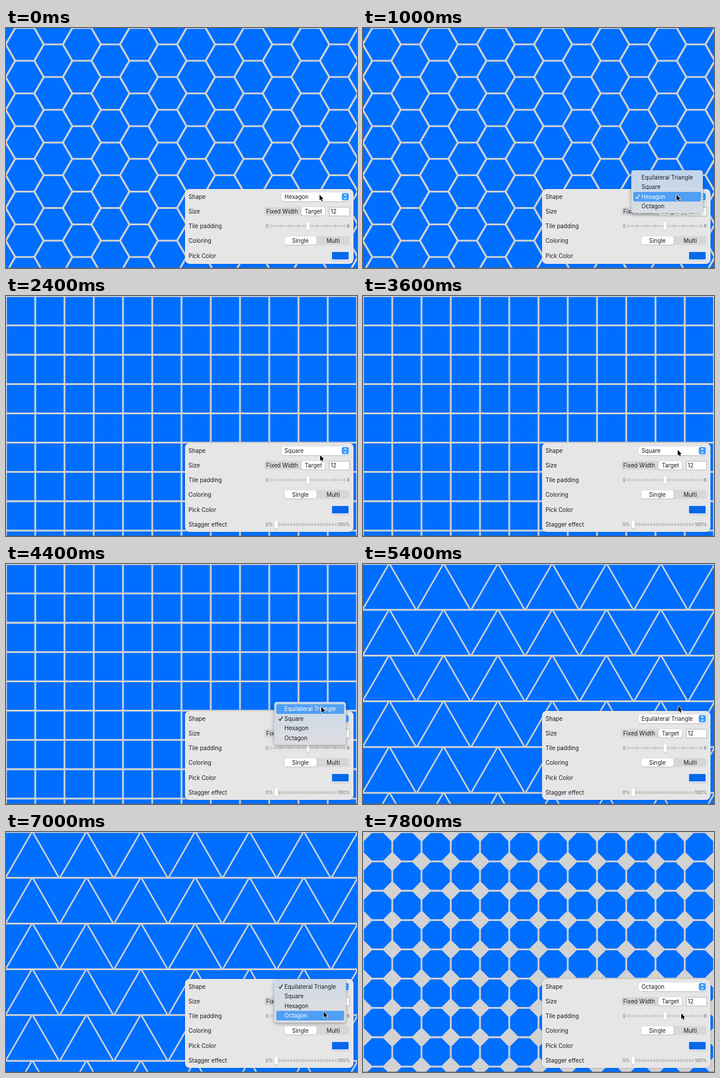
Animation, 600 px wide and 410 px high, one loop 8 s. Source, as an HTML page with a canvas:

```html
<!DOCTYPE html>
<html lang="en">
<head>
<meta charset="utf-8">
<title>Tile shapes</title>
<style>
html, body { margin: 0; width: 100%; height: 100%; overflow: hidden; background: #d2d2d2; }
canvas { display: block; }
</style>
</head>
<body>
<canvas id="stage" width="600" height="410"></canvas>
<script>
const ctx = document.getElementById('stage').getContext('2d');
const W = 600, H = 410, LOOP = 8000, STEP = 200;
const BLUE = '#006fff', GRAY = '#d2d2d2', INK = '#1c1c1e';
const PAD = 3, ROW = 16.5, SIN60 = Math.sqrt(3) / 2;
const FONT = 'Inter, Roboto, sans-serif';
const SHAPES = ['Equilateral Triangle', 'Square', 'Hexagon', 'Octagon'];

// start time, shape index
const scenes = [[0, 2], [2200, 1], [5000, 0], [7400, 3]];
// open time, close time
const menus = [[400, 2200], [4000, 5000], [6200, 7400]];
// time, x, y of the pointer tip
const pointer = [
  [0, 536, 285], [1000, 536, 285], [1800, 537, 272], [2600, 537, 272],
  [3600, 538, 263], [4000, 538, 263], [4400, 539, 244], [5400, 539, 243],
  [6000, 541, 262], [6200, 541, 262], [7000, 543, 307], [7400, 543, 307],
  [7800, 544, 310], [8000, 544, 310]
];

function pointerAt(t) {
  const i = Math.max(1, pointer.findIndex(k => k[0] > t));
  const [a, b] = [pointer[i - 1], pointer[i]];
  const u = (t - a[0]) / (b[0] - a[0]);
  const e = u * u * (3 - 2 * u);
  return [a[1] + (b[1] - a[1]) * e, a[2] + (b[2] - a[2]) * e];
}

function poly(points) {
  points.forEach(([x, y], i) => i ? ctx.lineTo(x, y) : ctx.moveTo(x, y));
  ctx.closePath();
}

function box(x, y, w, h, r, fill, stroke) {
  ctx.beginPath();
  ctx.roundRect(x, y, w, h, r);
  ctx.fillStyle = fill;
  ctx.fill();
  if (stroke) {
    ctx.strokeStyle = stroke;
    ctx.lineWidth = 1;
    ctx.stroke();
  }
}

function raised(x, y, w, h, r, fill = '#fff') {
  ctx.save();
  ctx.shadowColor = 'rgba(0,0,0,.3)';
  ctx.shadowBlur = 1.5;
  ctx.shadowOffsetY = 0.5;
  box(x, y, w, h, r, fill);
  ctx.restore();
}

function text(s, x, mid, { size = 9.75, color = INK, align = 'left' } = {}) {
  ctx.font = `${size}px ${FONT}`;
  ctx.textAlign = align;
  ctx.fillStyle = color;
  ctx.fillText(s, x, mid + size * 0.38);
}

function triangles() {
  const h = 75.2, a = h / SIN60, half = a / 2 + PAD;
  for (let y = PAD / 2; y < H; y += h + PAD) {
    for (let i = -1; i < 14; i++) {
      const x = PAD / 2 + i * half;
      const [base, tip] = i % 2 ? [y, y + h] : [y + h, y];
      poly([[x, base], [x + a, base], [x + a / 2, tip]]);
    }
  }
}

function squares() {
  for (let y = 0.3; y < H; y += 50.05)
    for (let x = 0; x < W; x += 50)
      ctx.rect(x + PAD / 2, y + PAD / 2, 50 - PAD, 50 - PAD);
}

function hexagons() {
  const dy = 55.9, s = (dy - PAD) / SIN60 / 2, dx = 1.5 * s + PAD;
  for (let c = -1; c < 13; c++) {
    for (let r = 0; r < 9; r++) {
      const x = PAD / 2 + s + c * dx, y = (r + (c % 2 ? 0 : 0.5)) * dy;
      poly([0, 1, 2, 3, 4, 5].map(k => [
        x + s * Math.cos(k * Math.PI / 3), y + s * Math.sin(k * Math.PI / 3)
      ]));
    }
  }
}

function octagons() {
  const n = 50 - PAD, c = n / (2 + Math.SQRT2);
  for (let y = 0.3 + PAD / 2; y < H; y += 50.05)
    for (let x = PAD / 2; x < W; x += 50)
      poly([
        [x + c, y], [x + n - c, y], [x + n, y + c], [x + n, y + n - c],
        [x + n - c, y + n], [x + c, y + n], [x, y + n - c], [x, y + c]
      ]);
}

const patterns = [triangles, squares, hexagons, octagons];

function drawTiles(shape) {
  ctx.fillStyle = GRAY;
  ctx.fillRect(0, 0, W, H);
  ctx.beginPath();
  patterns[shape]();
  ctx.fillStyle = BLUE;
  ctx.fill();
  ctx.fillStyle = 'rgba(90,90,90,.5)';
  ctx.fillRect(0, H - 1, W, 1);
}

function segmented(x, mid, w, selX, selW, labels) {
  box(x, mid - 7.5, w, 15, 4, '#d7d7d8');
  raised(selX, mid - 7.2, selW, 14.4, 4);
  for (const [s, cx] of labels) text(s, cx, mid, { align: 'center' });
}

function slider(mid, from, to, ticks, first, last, thumb) {
  box(from, mid - 1.5, to - from, 3, 1.5, '#d0d0d1');
  ctx.fillStyle = '#bcbcbd';
  for (let i = 0; i < ticks; i++)
    ctx.fillRect(first + (last - first) * i / (ticks - 1) - 0.6, mid - 3, 1.2, 6);
  raised(thumb - 2.8, mid - 7, 5.6, 14, 2.8);
}

function chevrons(x, mid) {
  ctx.strokeStyle = '#fff';
  ctx.lineWidth = 1.1;
  ctx.beginPath();
  for (const d of [-1, 1]) {
    ctx.moveTo(x - 2.2, mid + d * 1.6);
    ctx.lineTo(x, mid + d * 3.8);
    ctx.lineTo(x + 2.2, mid + d * 1.6);
  }
  ctx.stroke();
}

function drawPanel(shape, top) {
  const small = { size: 8, color: '#6b6b6d', align: 'center' };
  const y = [13.5, 38.2, 63.2, 88, 114, 139.3].map(d => top + d);
  ctx.save();
  ctx.shadowColor = 'rgba(0,0,0,.25)';
  ctx.shadowBlur = 3;
  box(306, top, 288, 403 - top, 8, '#e6e6e7');
  ctx.restore();

  const labels = ['Shape', 'Size', 'Tile padding', 'Coloring', 'Pick Color'];
  if (shape !== 2) labels.push('Stagger effect');
  labels.forEach((s, i) => text(s, 312, y[i]));

  raised(471, y[0] - 7.5, 116, 15, 4);
  text(SHAPES[shape], 476, y[0] - 0.5);
  box(574, y[0] - 6.5, 12, 12.5, 3, '#3b9bfb');
  chevrons(580, y[0] - 0.3);

  segmented(441.5, y[1], 104.5, 505, 40.5, [['Fixed Width', 472], ['Target', 525.4]]);
  box(552.5, y[1] - 7, 35, 15, 0, '#fff', '#b4b4b6');
  text('12', 555, y[1] + 0.3);

  text('0', 446.5, y[2], small);
  slider(y[2], 452, 580, 9, 453, 579, 516.3);
  text('8', 585, y[2], small);

  segmented(476, y[3], 111, 476, 55, [['Single', 503.2], ['Multi', 559.3]]);

  raised(555.8, y[4] - 7.9, 31.4, 15.8, 2);
  box(557.2, y[4] - 6.5, 28.6, 13, 1, '#0768e8');

  if (shape !== 2) {
    text('0%', 450, y[5], small);
    slider(y[5], 459, 566, 21, 462, 564, 462);
    text('100%', 577.5, y[5], small);
  }
}

function drawMenu(checked, top, tipY) {
  const mid = top + 13.2;
  const menuTop = mid - checked * ROW - 12.2;
  const tint = ctx.createLinearGradient(0, top - 32, 0, top + 45);
  tint.addColorStop(0, '#c0d6ec');
  tint.addColorStop(1, '#dbdde2');
  ctx.save();
  ctx.shadowColor = 'rgba(0,0,0,.35)';
  ctx.shadowBlur = 6;
  ctx.shadowOffsetY = 2;
  box(458.5, menuTop, 122.5, 73.5, 4.5, tint);
  ctx.restore();

  SHAPES.forEach((s, i) => {
    const y = mid + (i - checked) * ROW;
    const hot = Math.abs(tipY - y) <= ROW / 2;
    const color = hot ? '#fff' : INK;
    if (hot) box(462, y - 8.2, 116, ROW, 3, '#509ff4');
    text(s, 476, y, { color });
    if (i === checked) {
      ctx.strokeStyle = color;
      ctx.lineWidth = 1.3;
      ctx.beginPath();
      ctx.moveTo(466.2, y + 0.4);
      ctx.lineTo(468.6, y + 3.2);
      ctx.lineTo(472.8, y - 3.6);
      ctx.stroke();
    }
  });
}

function drawPointer(x, y) {
  ctx.beginPath();
  poly([[0, 0], [0, 9.6], [2.1, 7.6], [3.6, 11], [5.2, 10.3], [3.8, 7], [6.6, 6.8]]
    .map(([dx, dy]) => [x + dx, y + dy]));
  ctx.strokeStyle = '#fff';
  ctx.lineWidth = 1.4;
  ctx.lineJoin = 'round';
  ctx.stroke();
  ctx.fillStyle = '#000';
  ctx.fill();
}

function draw(t) {
  const shape = scenes.filter(s => s[0] <= t).pop()[1];
  const top = shape === 2 ? 275 : 251;
  const [x, y] = pointerAt(t);
  drawTiles(shape);
  drawPanel(shape, top);
  if (menus.some(([a, b]) => t >= a && t < b)) drawMenu(shape, top, y);
  drawPointer(x, y);
}

const start = performance.now();
function tick() {
  const t = (performance.now() - start) % LOOP;
  draw(Math.floor(t / STEP) * STEP);
  requestAnimationFrame(tick);
}
tick();
</script>
</body>
</html>
```
